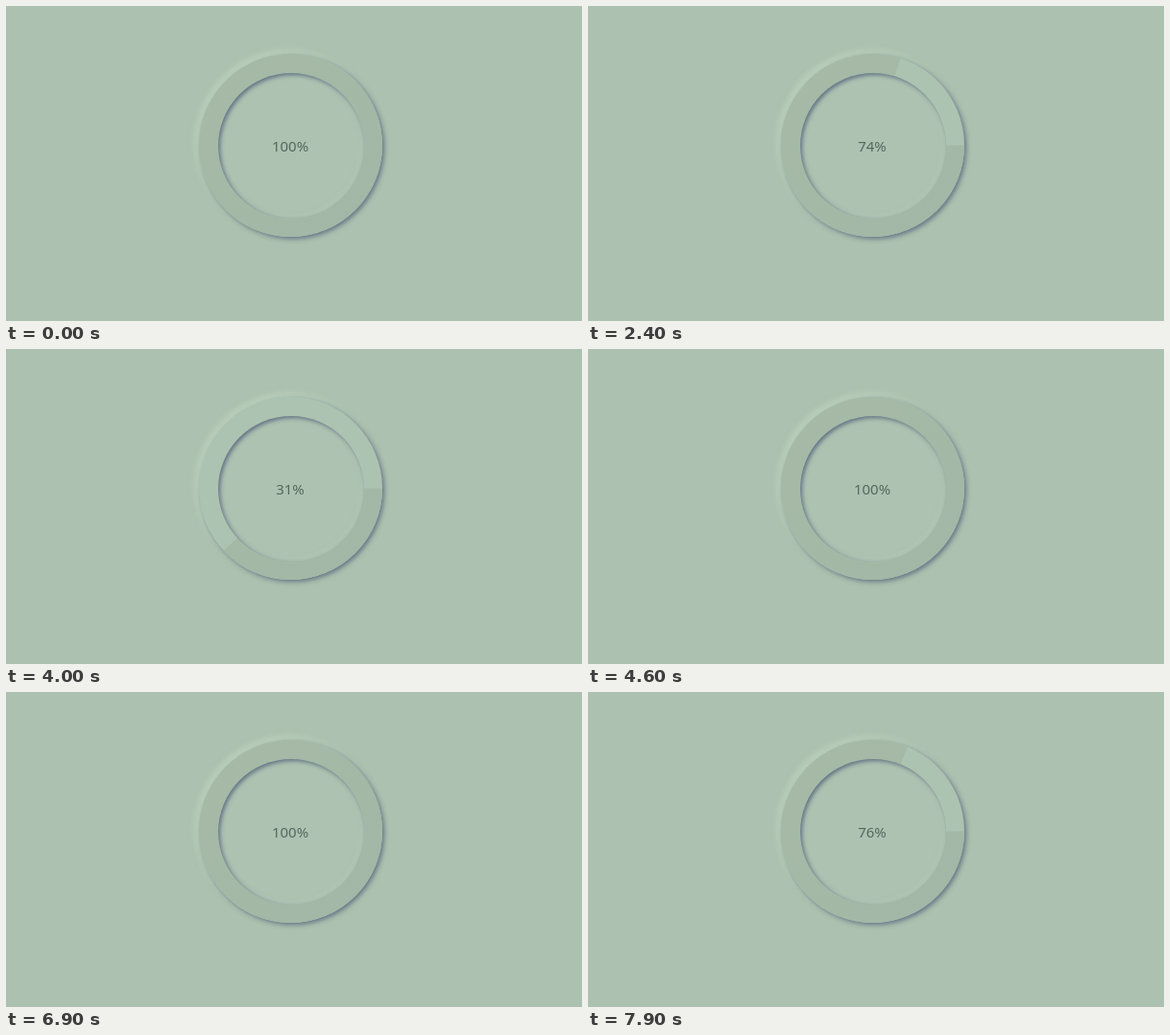
An HTML page that plays this animation: 600x329 px, repeating every 8000 ms.

```html
<!DOCTYPE html>
<html lang="en">
<head>
<meta charset="utf-8">
<title>Soft progress ring</title>
<style>
  html, body { margin: 0; width: 100%; height: 100%; overflow: hidden; background: #acc1af; }
  .disc { position: absolute; border-radius: 50%; }
  #base {
    left: 201px; top: 50px; width: 191px; height: 191px;
    background: #adc3b1;
    box-shadow: 2px 2px 5px rgba(70, 85, 115, .72), -3px -3px 7px rgba(200, 221, 198, .7);
  }
  #well {
    left: 220.5px; top: 69.5px; width: 152px; height: 152px;
    background: #adc2b1;
    box-shadow: inset 2px 2px 4px rgba(70, 85, 115, .72), inset -2px -2px 5px rgba(190, 209, 188, .35);
  }
  svg { position: absolute; left: 0; top: 0; }
  #label {
    position: absolute; left: 196px; top: 134.5px; width: 200px;
    font: 15px/22px "Noto Sans", "Open Sans", sans-serif;
    color: #56685c; text-align: center;
  }
</style>
</head>
<body>
<div id="base" class="disc"></div>
<svg width="600" height="329">
  <defs>
    <linearGradient id="tint" x1="0" y1="0" x2="1" y2="1">
      <stop offset="0" stop-color="#a6baa6"/>
      <stop offset="1" stop-color="#a2b7a6"/>
    </linearGradient>
  </defs>
  <circle id="arc" cx="296.5" cy="145.5" r="85.5" pathLength="1" fill="none" stroke="url(#tint)" stroke-width="20"/>
</svg>
<div id="well" class="disc"></div>
<div id="label">100%</div>
<script>
  const LOOP = 8000, STEP = 100, RUN = 1000, LAG = 42;
  // [reset time, delay before the arc grows]
  const RUNS = [[1800, -90], [3600, -30], [5400, 40], [7200, 0]];
  const arc = document.getElementById('arc');
  const label = document.getElementById('label');

  // cubic-bezier(.42, 0, .58, 1)
  function easeInOut(x) {
    if (x <= 0) return 0;
    if (x >= 1) return 1;
    let lo = 0, hi = 1;
    for (let i = 0; i < 30; i++) {
      const s = (lo + hi) / 2;
      if (((0.52 * s - 0.78) * s + 1.26) * s < x) lo = s; else hi = s;
    }
    return lo * lo * (3 - 2 * lo);
  }

  function draw(ms) {
    const t = Math.floor((ms % LOOP) / STEP) * STEP;
    const run = RUNS.filter(r => r[0] <= t).pop();
    const age = run ? t - run[0] - run[1] : Infinity;
    const part = easeInOut(age / RUN);
    arc.style.strokeDasharray = part < 1 ? part + ' 2' : 'none';
    label.textContent = Math.round(100 * easeInOut((age - LAG) / RUN)) + '%';
  }

  const start = performance.now();
  function tick(now) {
    draw(Math.max(0, now - start));
    requestAnimationFrame(tick);
  }
  draw(0);
  requestAnimationFrame(tick);
</script>
</body>
</html>
```
